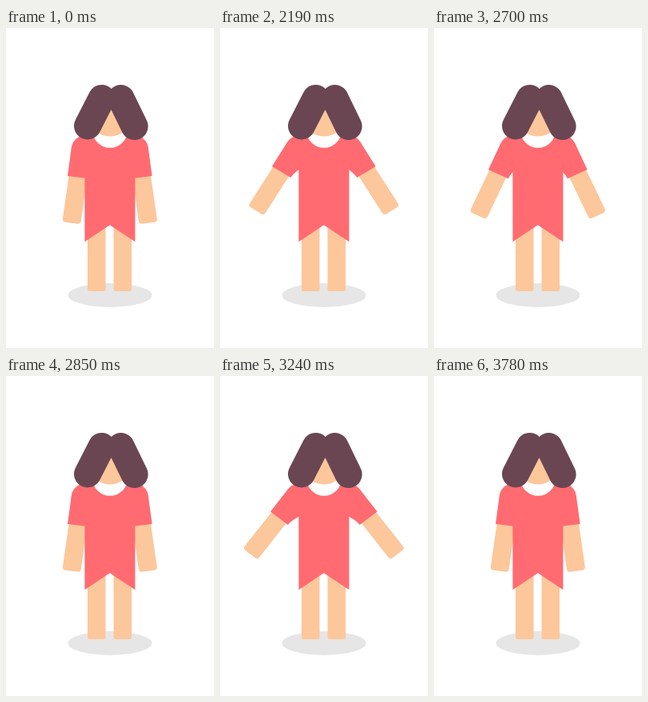
An HTML page for the animation above (6 s loop, 260 by 400 pixels).

```html
<!DOCTYPE html>
<html lang="en">
<head>
<meta charset="utf-8">
<title>Arm swing</title>
<style>
  html, body {
    margin: 0;
    width: 100%;
    height: 100%;
    overflow: hidden;
    background: #fff;
  }
  svg {
    display: block;
    width: 100%;
    height: 100%;
  }
  .skin { fill: #fcc79b; }
  .dress { fill: #ff6b71; }
  .hair { fill: none; stroke: #6a4652; stroke-width: 34; stroke-linecap: round; }
  .arm { transform-origin: 98.7px 151.4px; }
</style>
</head>
<body>
<svg viewBox="0 0 260 400">
  <defs>
    <g id="limb">
      <path class="skin" d="M78.7 184 L70.9 238.3 Q70.3 242.2 74.3 242.7 L89.3 244.7 Q93.3 245.2 93.8 241.2 L101.4 187Z"/>
      <circle class="dress" cx="98.7" cy="151.4" r="17"/>
      <path class="dress" d="M81.9 149.1 L77 185 L104.1 188.2 Q106 178 114 168 L110 149Z"/>
    </g>
  </defs>

  <ellipse cx="130" cy="334" rx="52.5" ry="15" fill="#e6e6e6"/>
  <rect class="skin" x="102" y="236" width="22.5" height="93" rx="2.5"/>
  <rect class="skin" x="134.5" y="236" width="22.5" height="93" rx="2.5"/>

  <g class="arm"><use href="#limb"/></g>
  <g transform="translate(259.6 0) scale(-1 1)">
    <g class="arm"><use href="#limb"/></g>
  </g>

  <path class="dress" d="M98.4 136 H161.4 V267.3 L129.8 246.2 L98.4 267.3Z"/>
  <circle cx="130" cy="127.8" r="22" fill="#fff"/>
  <circle class="skin" cx="130" cy="108" r="27.5"/>
  <path class="hair" d="M102 122.4 L119.6 88 M160.6 123 L143.6 88"/>
</svg>

<script>
  const LOOP = 6000, STEP = 30, SWING = 900, REACH = 31.4;
  const STARTS = [1950, 2880];
  const arms = document.querySelectorAll('.arm');

  // Each swing is a parabola: up and back down in SWING ms.
  function angleAt(t) {
    for (const start of STARTS) {
      const u = (t - start) / SWING;
      if (u > 0 && u < 1) return REACH * 4 * u * (1 - u);
    }
    return 0;
  }

  function draw() {
    const t = Math.floor(performance.now() % LOOP / STEP) * STEP;
    const turn = `rotate(${angleAt(t)}deg)`;
    for (const arm of arms) arm.style.transform = turn;
    requestAnimationFrame(draw);
  }
  draw();
</script>
</body>
</html>
```
